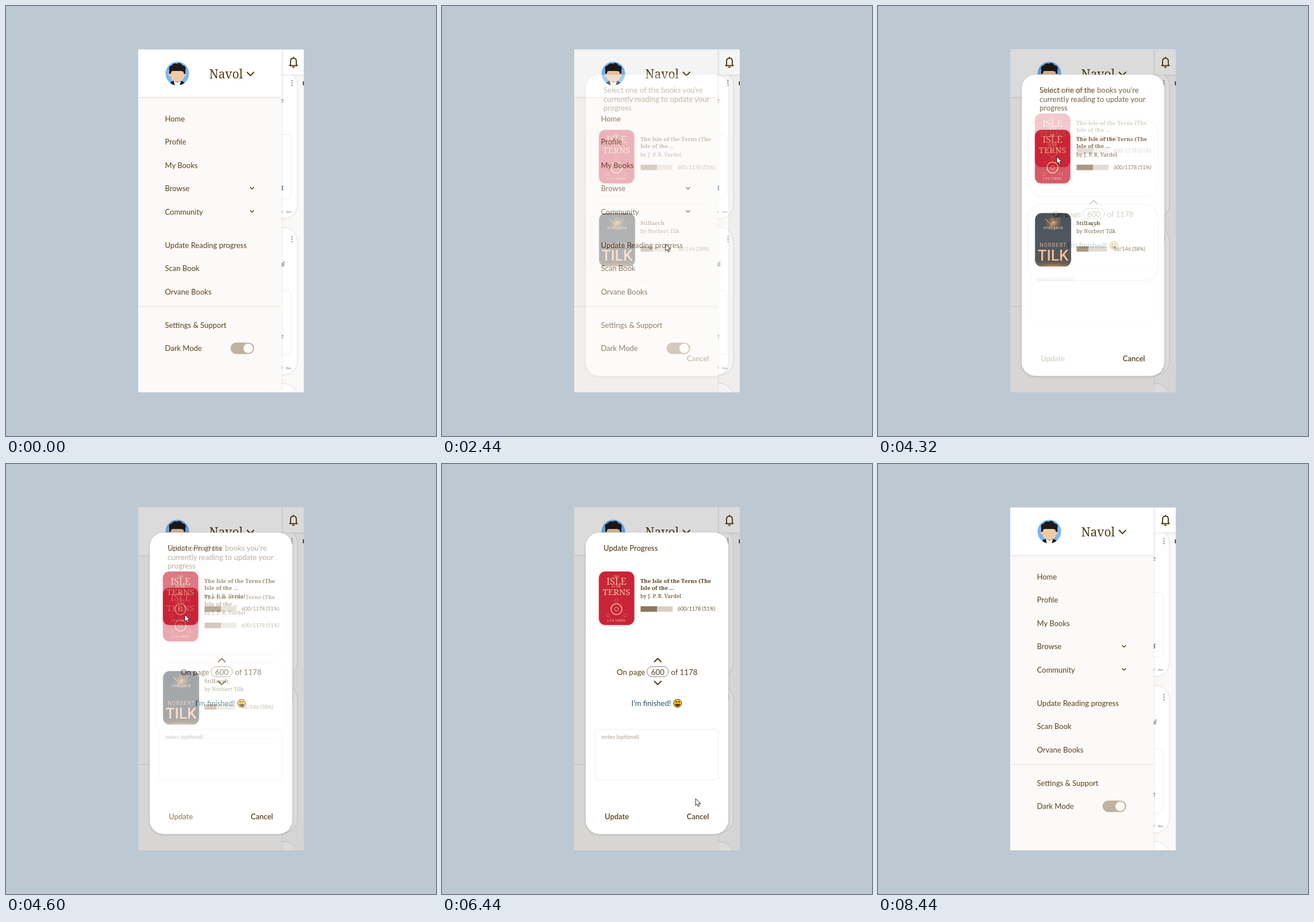
An HTML page that plays this animation: 748 px wide and 748 px high, repeating every 9.72 s.

```html
<!DOCTYPE html>
<html lang="en">
<head>
<meta charset="utf-8">
<title>Reading progress</title>
<style>
  html, body { margin: 0; width: 100%; height: 100%; overflow: hidden; background: #bcc9d3; }
  svg { display: block; width: 100%; height: 100%; }
  text { font: 13px Lato, sans-serif; fill: #5a421c; }
  .serif { font-family: "Noto Serif", serif; }
  .name { font-size: 21px; fill: #553b12; }
  .title { font-size: 9.6px; font-weight: 700; }
  .author { font-size: 9.4px; }
  .count { font-size: 9px; fill: #6a5436; }
  .head { font-weight: 500; }
  .btn { font-weight: 600; }
  .page { font-size: 13.3px; }
  .mid { text-anchor: middle; }
  .gold { fill: #e8c690; }
  .line { fill: none; stroke: #553b12; stroke-linecap: round; stroke-linejoin: round; }
  .edge { fill: #fff; stroke: #efeeed; }
  .soft { filter: drop-shadow(0 1px 2px rgba(0, 0, 0, .2)); }
  .bar { filter: drop-shadow(0 1px 2px rgba(0, 0, 0, .1)); }
  .cursor { fill: #fff; stroke: #26221f; stroke-linejoin: round; opacity: 0; }
  #overlay, #update { opacity: 0; }
</style>
</head>
<body>
<svg viewBox="0 0 748 748">
  <defs>
    <clipPath id="phone"><rect x="230" y="75" width="288" height="597"/></clipPath>
    <clipPath id="face"><circle cx="298" cy="117.5" r="20.5"/></clipPath>
    <clipPath id="jacket"><rect x="273.5" y="360.5" width="62" height="92.5" rx="11"/></clipPath>
    <linearGradient id="night" x2="0" y2="1">
      <stop offset="0" stop-color="#111a24"/>
      <stop offset=".6" stop-color="#1a222a"/>
      <stop offset=".88" stop-color="#211f1c"/>
      <stop offset="1" stop-color="#54421f"/>
    </linearGradient>
    <radialGradient id="glow">
      <stop offset="0" stop-color="#e8933c" stop-opacity=".75"/>
      <stop offset="1" stop-color="#8a4a1c" stop-opacity="0"/>
    </radialGradient>

    <g id="isle">
      <rect class="soft" x="273" y="215.5" width="61.5" height="93" rx="11" fill="#c92439"/>
      <g class="mid">
        <text class="serif gold" x="303.5" y="226.5" style="font-size:5px">THE</text>
        <text class="serif gold" x="303.5" y="238" style="font-size:16px">ISLE</text>
        <text class="serif gold" x="303.5" y="243.3" style="font-size:4.5px">OF THE</text>
        <text class="serif gold" x="303.5" y="256" style="font-size:15px">TERNS</text>
        <text class="serif gold" x="303.5" y="302" style="font-size:4.6px">J. P. R. VARDEL</text>
      </g>
      <g fill="none" stroke="#e8c690">
        <circle cx="303.5" cy="281" r="9.5" stroke-width="1.6"/>
        <circle cx="303.5" cy="281" r="3.4" stroke-width=".8"/>
        <g stroke-width=".5" opacity=".7">
          <circle cx="303.5" cy="265.5" r="2.8"/>
          <circle cx="288.5" cy="292" r="2.8"/>
          <circle cx="318.5" cy="292" r="2.8"/>
        </g>
      </g>
      <text class="serif title" x="345" y="235.3">The Isle of the Terns (The</text>
      <text class="serif title" x="345" y="247.4">Isle of the ...</text>
      <text class="serif author" x="345" y="261.7">by J. P. R. Vardel</text>
      <rect x="345.5" y="276" width="55.5" height="9.5" fill="#d7cfc5"/>
      <rect x="345.5" y="276" width="28.5" height="9.5" fill="#8e7759"/>
      <text class="count" x="409.7" y="283.7">600/1178 (51%)</text>
    </g>
  </defs>

  <rect width="748" height="748" fill="#bcc9d3"/>
  <g clip-path="url(#phone)">
    <rect x="230" y="75" width="288" height="597" fill="#faf9f8"/>
    <g id="feed"></g>
    <text x="477.3" y="168" style="font-size:10.5px;fill:#555">e</text>
    <text x="477" y="319" style="font-size:10.5px;font-weight:700;fill:#2c6478">g</text>
    <text x="475.5" y="453" style="font-size:11px;fill:#444">ul</text>
    <text x="477" y="578" style="font-size:10.5px;fill:#555">e</text>
    <text x="487" y="360.3" style="font-size:6.5px;fill:#777">6m</text>
    <text x="487" y="631.8" style="font-size:6.5px;fill:#777">8m</text>
    <rect x="516.5" y="131" width="3" height="7" fill="#2a2723"/>
    <rect class="bar" x="470" y="70" width="60" height="49" fill="#fff"/>

    <rect class="bar" x="228" y="70" width="251.5" height="610" fill="#fcfaf8"/>
    <rect class="bar" x="230" y="70" width="249.5" height="88" fill="#fff"/>
    <rect x="230" y="75" width="288" height="1.2" fill="#dce0e3"/>
    <g clip-path="url(#face)">
      <rect x="277" y="97" width="42" height="42" fill="#74b8f6"/>
      <path d="M283 140Q284 131 293 130H303Q312 131 313 140Z" fill="#1c1c20"/>
      <path d="M292 130.5 298 133 304 130.5 302 140H294Z" fill="#fff"/>
      <circle cx="285.5" cy="120" r="2.6" fill="#ecc29d"/>
      <circle cx="310.5" cy="120" r="2.6" fill="#ecc29d"/>
      <path d="M285.5 108H310.5V119Q310 131.5 298 132 286 131.5 285.5 119Z" fill="#f0cba8"/>
      <g fill="#1f1b1a">
        <circle cx="288.5" cy="108.5" r="5"/>
        <circle cx="294" cy="105.5" r="5.8"/>
        <circle cx="301" cy="105" r="6"/>
        <circle cx="307.5" cy="108.5" r="5.2"/>
        <path d="M284 108H312V118H309.5L308 113H288L286.5 118H284Z"/>
      </g>
    </g>
    <text class="serif name" x="353.5" y="125.5">Navol</text>
    <path class="line" d="M419.5 115.2 425.3 121 431 115.2" stroke-width="2"/>
    <g id="menu"></g>
    <path class="line" d="M425 315.5 428 318.5 431 315.5M425 355.8 428 358.8 431 355.8" stroke-width="1.4"/>
    <path d="M230 522.8H479.5" stroke="#e6e3e0" stroke-width="1.2"/>
    <rect x="390.5" y="585.5" width="41.2" height="20" rx="10" fill="#bfb29e"/>
    <circle cx="421.2" cy="595.5" r="8.3" fill="#fcfaf8"/>

    <g id="overlay">
      <rect x="230" y="76" width="288" height="596" fill="#000" opacity=".14"/>
      <rect class="soft" x="250" y="119.5" width="248" height="524" rx="24" fill="#fff"/>
      <g>
        <text class="head" x="281" y="151">Select one of the books you're</text>
        <text class="head" x="281" y="166.5">currently reading to update your</text>
        <text class="head" x="281" y="181.8">progress</text>
        <rect class="edge" x="260.5" y="198.5" width="227" height="133" rx="24"/>
        <rect class="edge" x="260.5" y="344.5" width="227" height="133" rx="24"/>
        <use href="#isle"/>
        <rect class="soft" x="273.5" y="360.5" width="62" height="92.5" rx="11" fill="#151e27"/>
        <g clip-path="url(#jacket)">
          <rect x="273" y="360" width="63" height="94" fill="url(#night)"/>
          <ellipse cx="305" cy="378" rx="15" ry="14" fill="url(#glow)"/>
          <ellipse cx="305" cy="455" rx="30" ry="9" fill="url(#glow)"/>
          <g id="sparks" fill="#f0a850"></g>
        </g>
        <g class="mid">
          <text class="serif" x="305" y="387.5" style="font-size:5px;letter-spacing:.8px;fill:#f2eee8">STILLARCH</text>
          <text x="305" y="419" style="font:400 8.8px Roboto,sans-serif;letter-spacing:1.3px;fill:#d98f68">NORBERT</text>
          <text x="304.5" y="443" style="font:500 26px Roboto,sans-serif;fill:#eaa878">TILK</text>
        </g>
        <text class="serif title" x="345" y="381">Stillarch</text>
        <text class="serif author" x="345" y="394.5">by Norbert Tilk</text>
        <rect x="345.5" y="418" width="52.5" height="9.3" fill="#d7cfc5"/>
        <rect x="345.5" y="418" width="20.5" height="9.3" fill="#8e7759"/>
        <text class="count" x="409.7" y="426.3">56/146 (38%)</text>
      </g>

      <g id="update">
        <rect x="250" y="119.5" width="248" height="524" rx="24" fill="#fff"/>
        <text class="head" x="281" y="151">Update Progress</text>
        <use href="#isle" y="-28.5"/>
        <path class="line" d="M369.5 344 375.2 338.3 381 344M369.5 378 375.2 383.7 381 378" stroke-width="2"/>
        <text class="page" x="304" y="366.7">On page</text>
        <rect x="356.5" y="352.5" width="37.5" height="17.5" rx="8.7" fill="none" stroke="#857c78"/>
        <text class="page mid" x="375.3" y="366.7">600</text>
        <text class="page" x="398.3" y="366.7">of 1178</text>
        <text x="329.5" y="421" style="fill:#20586e">I'm finished!</text>
        <circle cx="409.8" cy="416.3" r="7.1" fill="#fcc21f" stroke="#4d3c20"/>
        <g fill="#4d3018">
          <path d="M405.3 417.5H414.3Q413.8 421.8 409.8 421.8 405.8 421.8 405.3 417.5Z"/>
          <ellipse cx="407.4" cy="413.7" rx="1.1" ry="1.8"/>
          <ellipse cx="412.2" cy="413.7" rx="1.1" ry="1.8"/>
        </g>
        <rect class="edge" x="266.5" y="461.5" width="214" height="87.5" rx="3"/>
        <text x="277.5" y="478.3" style="font-size:9.6px;fill:#a99c8c">notes (optional)</text>
        <text class="btn" x="283" y="618.3">Update</text>
      </g>
      <text class="btn" x="425.8" y="618.3">Cancel</text>
    </g>

    <g class="line" stroke-width="2">
      <path d="M495 102.3V96Q495 90.8 500 90.8T505 96V102.3L506.5 103.8H493.5ZM500 90V89.2"/>
      <path d="M498.8 106.4H501.2"/>
    </g>
    <g id="pointer">
      <path id="arrow" class="cursor" d="M0 0V12L2.8 9.5 4.8 13.8 6.8 12.9 4.9 8.7H8.8Z"/>
      <path id="hand" class="cursor" d="M-1.2 1.2C-1.2-.4 1-.4 1 1.2V5L5 5.8Q6.2 6.2 6 7.6L5.2 12H-1L-4.2 7.6Q-4.6 6.2-3 6.4L-1.2 7.8Z"/>
    </g>
  </g>
</svg>
<script>
const LOOP = 9720;
const $ = id => document.getElementById(id);

const items = [
  ['Home', 201], ['Profile', 241.3], ['My Books', 282], ['Browse', 322],
  ['Community', 362.5], ['Update Reading progress', 420.8], ['Scan Book', 461],
  ['Orvane Books', 501.6], ['Settings &amp; Support', 559.8], ['Dark Mode', 600]
];
$('menu').innerHTML = items.map(([label, y]) => `<text x="276.5" y="${y}">${label}</text>`).join('');

const card = y => `<g transform="translate(0 ${y})">
  <rect x="400" y="113.5" width="107" height="256.5" rx="24" fill="#fff" stroke="#dedddc"/>
  <rect x="400" y="223.5" width="95.5" height="112" rx="6" class="edge"/>
  ${[129.8, 134, 138.2].map(c => `<circle cx="497.3" cy="${c}" r="1.4" fill="#a5a3a1"/>`).join('')}
  <rect x="479" y="356" width="1.5" height="3.5" fill="#999"/></g>`;
$('feed').innerHTML = [0, 271.6, 543.2].map(card).join('');

let seed = 7;
const rand = () => (seed = seed * 16807 % 2147483647) / 2147483647;
$('sparks').innerHTML = Array.from({ length: 44 }, () => {
  const a = rand() * Math.PI * 2, d = rand() * 16;
  const x = 305 + d * Math.cos(a), y = 377 + d * Math.sin(a) * .85;
  return `<circle cx="${x.toFixed(1)}" cy="${y.toFixed(1)}" r="${(.3 + rand() * .6).toFixed(2)}"/>`;
}).join('');

// Steps are [ms, value, easing to the next step].
function play(id, prop, steps) {
  const frames = steps.map(([ms, value, easing = 'linear']) =>
    ({ offset: ms / LOOP, [prop]: value, easing }));
  $(id).animate(frames, { duration: LOOP, iterations: Infinity });
}
const hold = (...steps) => steps.map(([ms, v]) => [ms, v, 'steps(1, end)']);
const at = (x, y) => `translate(${x}px, ${y}px)`;
const SOFT = 'cubic-bezier(.3, .1, .7, .9)';

play('overlay', 'opacity', [[0, 0], [2110, 0], [3120, 1], [7030, 1, SOFT], [8005, 0], [LOOP, 0]]);
play('update', 'opacity', [[0, 0], [4030, 0, SOFT], [5005, 1], [9000, 1], [9000, 0], [LOOP, 0]]);
play('pointer', 'transform', [
  [0, at(497, 446)],
  [900, at(497, 446), 'ease-out'],
  [1840, at(389, 414)],
  [2700, at(389, 414), 'ease-in'],
  [3240, at(324, 307), 'ease-out'],
  [3680, at(311, 262)],
  [5060, at(311, 262), 'ease-in'],
  [5560, at(339, 297)],
  [6000, at(412, 484), 'ease-out'],
  [6760, at(450, 612)],
  [7980, at(450, 612), 'ease-in'],
  [8430, at(519, 606)],
  [LOOP, at(519, 606)]
]);
play('arrow', 'opacity', hold([0, 0], [915, 1], [1720, 0], [2150, 1], [3150, 0],
  [4025, 1], [6480, 0], [7030, 1], [8430, 0], [LOOP, 0]));
play('hand', 'opacity', hold([0, 0], [1720, 1], [2150, 0], [3150, 1],
  [4025, 0], [6480, 1], [7030, 0], [LOOP, 0]));
</script>
</body>
</html>
```
